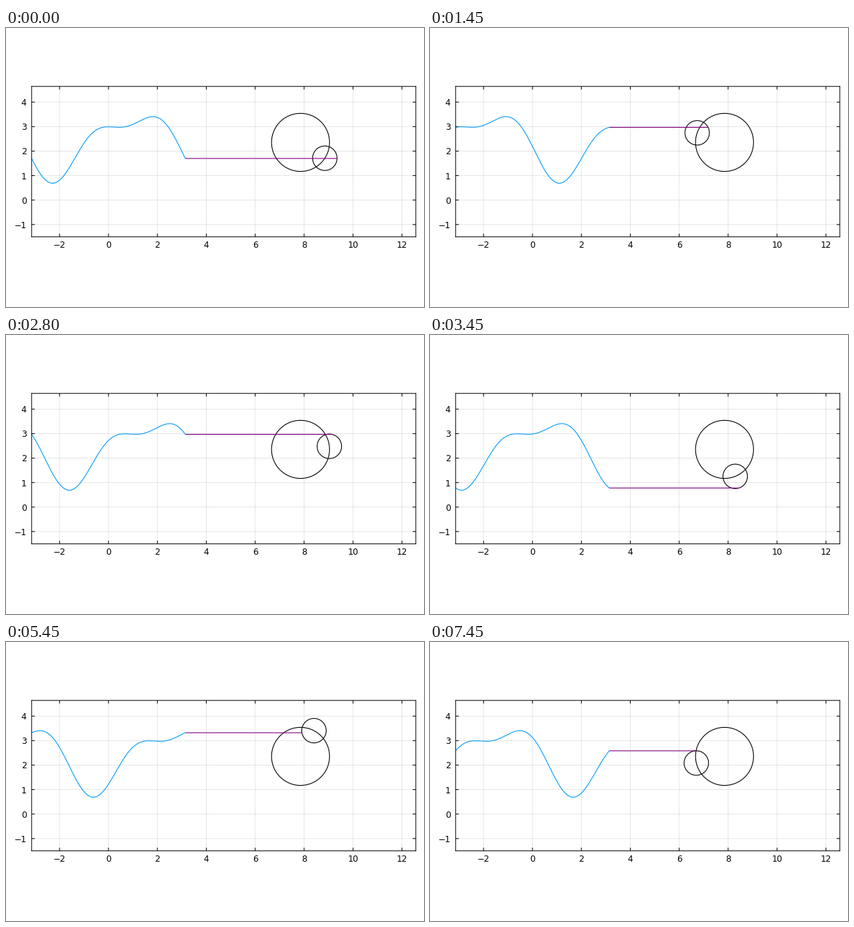
Recreate the animation shown at these times as a matplotlib script. Size 600 by 400 pixels, loop 7500 ms.

```python
import numpy as np
import matplotlib.pyplot as plt
from matplotlib.animation import FuncAnimation

plt.rcParams["font.family"] = "DejaVu Sans"

W, H, DPI = 600, 400, 100
FRAMES, INTERVAL = 150, 50
PX = 72 / DPI
PI = np.pi

# Two Fourier terms of a ramp that rises to pi and then stays flat
MEAN = 3 * PI / 4
TERMS = [(1, 2 / PI, 1.0), (2, 0.0, -0.5)]  # order, cosine, sine
CENTER = (2.5 * PI, MEAN)

LEFT, RIGHT, TOP, BOTTOM = 36.8, 588.2, 83.76, 299.35
TICK = 4.5
XTICKS, YTICKS = range(-2, 13, 2), range(-1, 5)


def wave(t):
    return MEAN + sum(a * np.cos(n * t) + b * np.sin(n * t) for n, a, b in TERMS)


def arm(t, n, a, b):
    c, s = np.cos(n * t), np.sin(n * t)
    return np.array([a * s - b * c, a * c + b * s])


fig = plt.figure(figsize=(W / DPI, H / DPI), dpi=DPI, facecolor="white")
ax = fig.add_axes([LEFT / W, 1 - BOTTOM / H, (RIGHT - LEFT) / W, (BOTTOM - TOP) / H])
ax.set_xlim(-PI, 4 * PI)
ax.set_ylim(-1.5, PI + 1.5)
ax.set_xticks(XTICKS)
ax.set_yticks(YTICKS)
ax.set_axisbelow(True)
ax.grid(color="black", alpha=0.1, lw=PX, snap=False)
ax.tick_params(length=0, labelsize=8.8)
ax.tick_params(axis="x", pad=5.5 * PX)
ax.tick_params(axis="y", pad=7.2 * PX)
for spine in ax.spines.values():
    spine.set_linewidth(PX)
    spine.set_snap(False)


def stroke(color, x=(), y=(), lw=1.1, **kw):
    line, = ax.plot(x, y, color=color, lw=lw * PX, snap=False,
                    solid_capstyle="butt", solid_joinstyle="round", **kw)
    return line


# Inward ticks on all four sides
dx, dy = TICK / (RIGHT - LEFT), TICK / (BOTTOM - TOP)
for x in XTICKS:
    for ends in ((0, dy), (1 - dy, 1)):
        stroke("black", (x, x), ends, 1, transform=ax.get_xaxis_transform())
for y in YTICKS:
    for ends in ((0, dx), (1 - dx, 1)):
        stroke("black", ends, (y, y), 1, transform=ax.get_yaxis_transform())

curve = stroke("#009afa")
rings = [stroke("black") for _ in TERMS]
link = stroke("purple")

xs = np.linspace(-PI, PI, 629)
angle = np.linspace(0, 2 * PI, 201)


def draw(k):
    shift = 0.01 + 0.1 * k
    t = PI + shift
    curve.set_data(xs, wave(xs + shift))
    tip = np.array(CENTER)
    for ring, (n, a, b) in zip(rings, TERMS):
        r = np.hypot(a, b)
        ring.set_data(tip[0] + r * np.cos(angle), tip[1] + r * np.sin(angle))
        tip = tip + arm(t, n, a, b)
    link.set_data([PI, tip[0]], [tip[1], tip[1]])
    return [curve, *rings, link]


anim = FuncAnimation(fig, draw, frames=FRAMES, interval=INTERVAL,
                     repeat=True, repeat_delay=0, blit=True)
plt.show()
```
